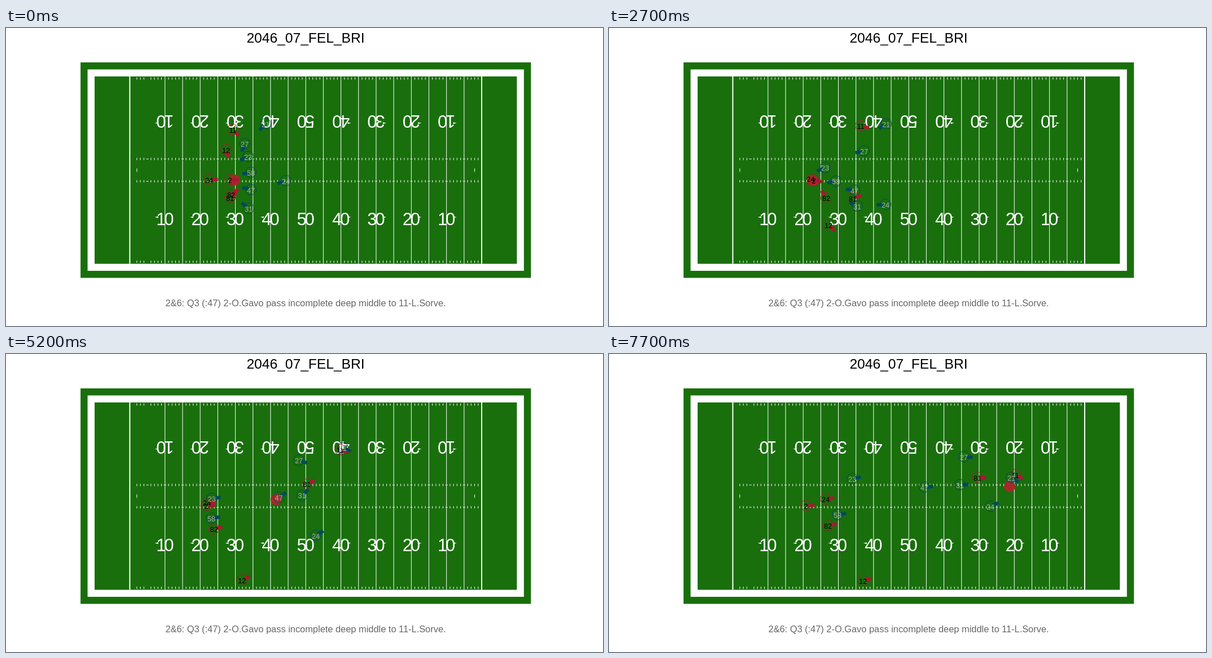
An HTML page for the animation above (7800 ms loop, 1058 by 529 pixels).

```html
<!DOCTYPE html>
<html lang="en">
<head>
<meta charset="utf-8">
<title>Play replay</title>
<style>
html, body { margin: 0; width: 100%; height: 100%; overflow: hidden; background: #fff; }
svg { display: block; width: 100vw; height: 100vh; font-family: "Liberation Sans", Arial, sans-serif; text-anchor: middle; }
</style>
</head>
<body>
<svg viewBox="0 0 1058 529">
  <rect width="1058" height="529" fill="#fff"/>
  <text x="531" y="26" font-size="24.6">2046_07_FEL_BRI</text>
  <g id="field" fill="#fff"></g>
  <circle id="ball" r="10" fill="#a52a2a"/>
  <g id="rings" fill="none"></g>
  <g id="bars" stroke-width="6"></g>
  <g id="labels" font-size="12.6"></g>
  <text x="531" y="494" font-size="16.4" fill="#666">2&amp;6: Q3 (:47) 2-O.Gavo pass incomplete deep middle to 11-L.Sorve.</text>
</svg>
<script>
const END = 7700, STEP = 100, LOOP = END + STEP;
const byId = id => document.getElementById(id);
const lerp = (a, b, u) => a + (b - a) * u;
const ease = (a, b, t) => {
  const u = Math.min(1, Math.max(0, (t - a) / (b - a)));
  return u * u * (3 - 2 * u);
};

function add(parent, tag, attrs, text) {
  const el = document.createElementNS('http://www.w3.org/2000/svg', tag);
  for (const k in attrs) el.setAttribute(k, attrs[k]);
  if (text !== undefined) el.textContent = text;
  parent.appendChild(el);
  return el;
}

// ---- Field, laid out in yards around its centre ----
const CX = 531.2, CY = 252.3, YARD = 6.236;
const WIDTH = 120 * YARD, HEIGHT = 160 / 3 * YARD;
const field = byId('field');
const yardX = yd => CX + (yd - 50) * YARD;

function box(x, y, width, height, fill = '#fff') {
  add(field, 'rect', { x: x - width / 2, y: y - height / 2, width, height, fill });
}

function drawNumber(yd) {
  const side = Math.sign(yd - 50), value = 50 - Math.abs(yd - 50);
  for (const turn of [0, 180]) {
    const y = CY + (turn ? -86.5 : 86.5);
    const g = add(field, 'g', {
      transform: `translate(${yardX(yd)} ${y}) rotate(${turn})`, 'font-size': 31
    });
    [...String(value)].forEach((d, i) => add(g, 'text', { x: i ? 7 : -7, y: 11 }, d));
    const s = turn ? -side : side;
    if (s) add(g, 'path', { d: `M${s * 18} -3L${s * 12} -4.5V-1.5Z` });
  }
}

function drawField() {
  ['#196f0c', '#fff', '#196f0c'].forEach((fill, i) => {
    const pad = (2 - i) * 4 * YARD;
    box(CX, CY, WIDTH + pad, HEIGHT + pad, fill);
  });
  for (const yd of [0, 100]) box(yardX(yd), CY, 2, HEIGHT);
  for (const yd of [2, 98]) box(yardX(yd), CY, 1, 6);
  for (let yd = 2; yd < 100; yd++) {
    const x = yardX(yd), onFive = yd % 5 === 0;
    if (onFive && yd > 5) box(x, CY, 1, HEIGHT);
    for (const side of [-1, 1]) {
      box(x, CY + side * 19.8, onFive ? 4 : 1, onFive ? 1 : 4);
      if (!onFive) box(x, CY + side * 162.7, 1, 4);
    }
  }
  for (let yd = 10; yd < 100; yd += 10) drawNumber(yd);
}

// ---- Motion ----
const PHASES = { start: 0, snap: 1100, drop: 2700, air: 4600, cut: 5800, end: END };
const THROW = 4100;

// Monotone cubic through key values; whoever waits for the snap starts from rest.
function curve(times, v) {
  const last = v.length - 1;
  const d = v.slice(1).map((b, i) => (b - v[i]) / (times[i + 1] - times[i]));
  const m = v.map((_, i) => {
    if (i === 0) return times[0] ? 0 : d[0];
    if (i === last) return d[last - 1];
    const p = d[i - 1], q = d[i];
    return p * q <= 0 ? 0 : 2 * p * q / (p + q);
  });
  return t => {
    if (t <= times[0]) return v[0];
    let i = 0;
    while (i < last - 1 && t >= times[i + 1]) i++;
    const h = times[i + 1] - times[i], u = (t - times[i]) / h, w = 1 - u;
    return w * w * ((1 + 2 * u) * v[i] + u * h * m[i])
         + u * u * ((3 - 2 * u) * v[i + 1] - w * h * m[i + 1]);
  };
}

const OFFENSE = { line: '#a71930', text: '#000', heading: () => 0.8 };
// Defenders look upfield first and turn round to chase the pass.
const DEFENSE = { line: '#004a5a', text: '#a5acaf', heading: t => lerp(-0.8, 0.8, ease(3200, 4600, t)) };

const players = [];
function player(number, team, route) {
  const times = Object.keys(route).map(k => PHASES[k]);
  const [x, y] = [0, 1].map(k => curve(times, Object.values(route).map(p => p[k])));
  const p = {
    x, y, team,
    ring: add(byId('rings'), 'circle', { r: 9.5, stroke: team.line }),
    bar: add(byId('bars'), 'path', { d: 'M4 0H15.5', stroke: team.line }),
    label: add(byId('labels'), 'text', { y: 5.5, fill: team.text }, number)
  };
  players.push(p);
  return p;
}

drawField();

const passer = player(2, OFFENSE, { snap: [397, 269], drop: [363, 270], end: [349, 269] });
player(24, OFFENSE, { snap: [360, 269], air: [354, 265], end: [384, 257] });
player(82, OFFENSE, { snap: [399, 295], air: [367, 311], end: [388, 304] });
player(81, OFFENSE, { snap: [397, 301], drop: [432, 302], air: [507, 251], cut: [561, 219], end: [653, 219] });
player(12, OFFENSE, { start: [390, 216], snap: [388, 273], drop: [389, 349], air: [411, 401], end: [450, 402] });
player(11, OFFENSE, { snap: [402, 180], drop: [446, 173], air: [554, 166], cut: [629, 177], end: [720, 214] });

player(58, DEFENSE, { snap: [434, 256], air: [361, 292], end: [405, 285] });
player(23, DEFENSE, { start: [429, 228], snap: [413, 234], air: [360, 259], end: [431, 221] });
player(47, DEFENSE, { snap: [434, 287], drop: [435, 288], air: [470, 270], cut: [499, 242], end: [559, 236] });
player(31, DEFENSE, { start: [430, 320], drop: [440, 316], air: [504, 271], cut: [546, 237], end: [622, 232] });
player(27, DEFENSE, { start: [423, 205], snap: [436, 223], drop: [452, 218], air: [498, 191], end: [629, 182] });
player(24, DEFENSE, { start: [496, 271], snap: [490, 289], drop: [490, 313], air: [528, 326], end: [676, 270] });
player(21, DEFENSE, { start: [460, 170], drop: [491, 170], air: [564, 163], cut: [631, 174], end: [713, 219] });

// The passer carries the ball, then it flies downfield and slows a little.
function ballAt(t) {
  const held = Math.min(t, THROW);
  const x = passer.x(held) + lerp(8, -2, ease(PHASES.snap, PHASES.drop, t));
  const y = passer.y(held) + 1;
  const u = Math.max(0, (t - THROW) / (END - THROW)), s = u * (1.2 - 0.2 * u);
  return [lerp(x, 710, s), lerp(y, 235, s)];
}

// Facing mixes running direction, a look at the ball and the team's heading.
function facing(p, t, [bx, by]) {
  const a = Math.max(0, t - 80), b = Math.min(END, t + 80), pull = 40 / (b - a);
  const dx = bx - p.x(t), dy = by - p.y(t), far = Math.hypot(dx, dy) + 10;
  return Math.atan2(
    (p.y(b) - p.y(a)) * pull + dy / far,
    (p.x(b) - p.x(a)) * pull + dx / far + p.team.heading(t)
  ) * 180 / Math.PI;
}

function draw(t) {
  const ball = ballAt(t);
  byId('ball').setAttribute('transform', `translate(${ball})`);
  for (const p of players) {
    const at = `translate(${p.x(t).toFixed(2)} ${p.y(t).toFixed(2)})`;
    p.ring.setAttribute('transform', at);
    p.label.setAttribute('transform', at);
    p.bar.setAttribute('transform', `${at} rotate(${facing(p, t, ball).toFixed(1)})`);
  }
}

const begin = performance.now();
function tick() {
  const t = (performance.now() - begin) % LOOP;
  draw(Math.floor(t / STEP) * STEP);
  requestAnimationFrame(tick);
}
tick();
</script>
</body>
</html>
```
